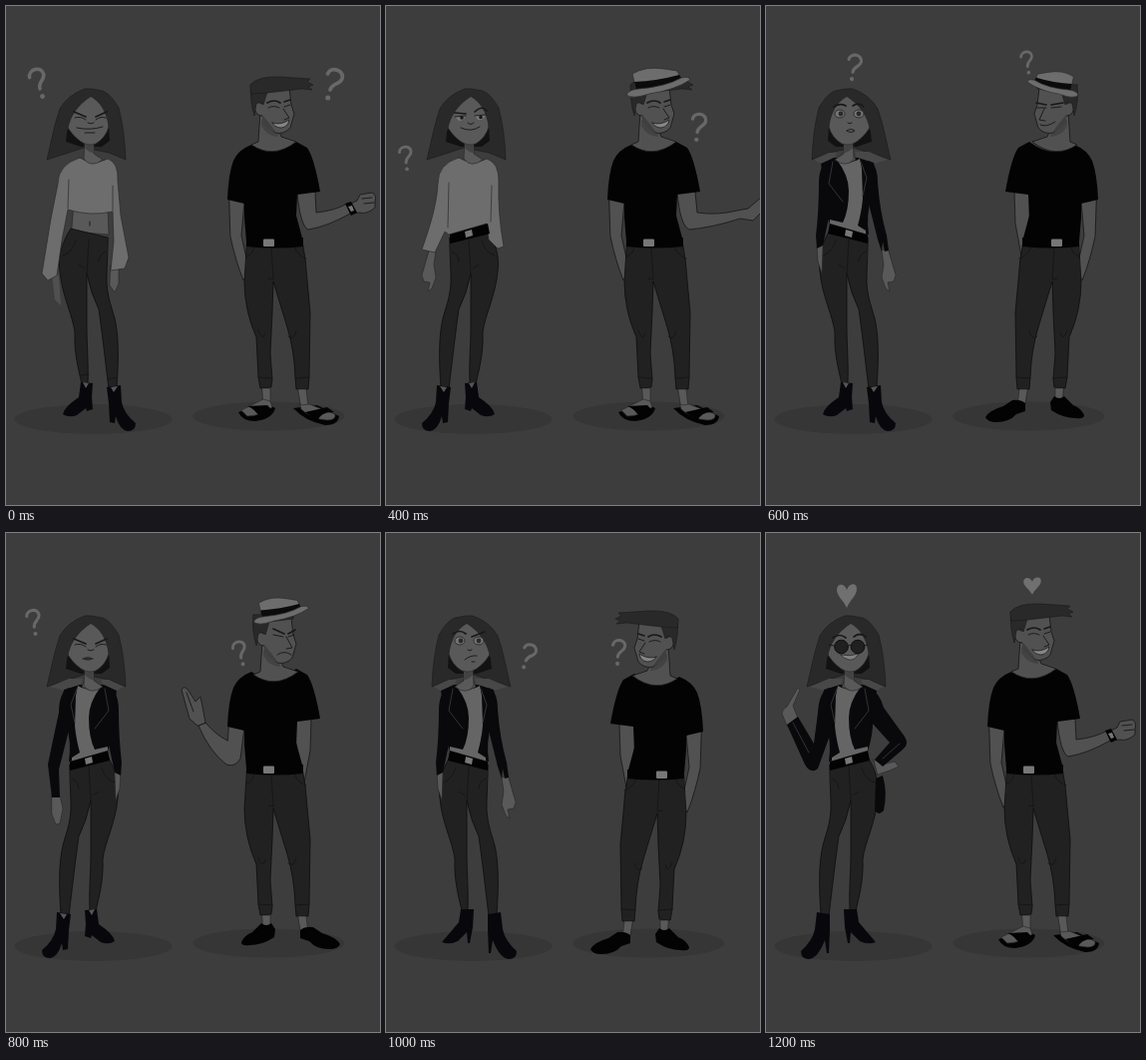
Write an HTML page that moves like this. It is 375 px wide and 500 px high and loops after 1.4 s.

```html
<!DOCTYPE html>
<html lang="en">
<head>
<meta charset="utf-8">
<title>Undecided couple</title>
<style>
html, body { margin: 0; width: 100%; height: 100%; overflow: hidden; background: #3d3d3d; }
svg { display: block; width: 375px; height: 500px; }
.pose { visibility: hidden; animation: show 1400ms step-end infinite; animation-delay: calc(200ms + var(--n) * 200ms); }
.first { animation: showLong 1400ms step-end infinite; }
@keyframes show { 0% { visibility: visible } 14.2857% { visibility: hidden } 100% { visibility: hidden } }
@keyframes showLong { 0% { visibility: visible } 28.5714% { visibility: hidden } 100% { visibility: hidden } }
path { stroke-linejoin: round; stroke-linecap: round; }
.skin { fill: #595959; stroke: #262626; stroke-width: .6; }
.tan { fill: #515151; stroke: #161616; stroke-width: .8; }
.shade { fill: #434343; }
.hair { fill: #292929; stroke: #1a1a1a; stroke-width: .6; }
.pants { fill: #212121; stroke: #0d0d0d; stroke-width: .8; }
.knit { fill: #6d6d6d; stroke: #2a2a2a; stroke-width: .7; }
.black { fill: #030303; }
.leather { fill: #09090c; }
.boot { fill: #08080c; }
.line { fill: none; stroke: #161616; stroke-width: .9; }
.thick { fill: none; stroke: #181818; stroke-width: 1.7; }
.zip { fill: none; stroke: #3e3e41; stroke-width: .8; }
.mark { fill: none; stroke: #686868; stroke-width: 3.6; }
.lit { fill: #777; }
.heart { fill: #707070; }
</style>
</head>
<body>
<svg viewBox="0 0 375 500">
<defs>
  <g id="ask">
    <path class="mark" d="M-7-9C-6-17 8-17 7.500-8C7-2-.5-2-.5 5"/>
    <circle cy="13" cx="-.5" r="2.400" fill="#686868"/>
  </g>
  <path id="heart" class="heart" d="M0 12C-3 5-10 0-10-6C-10-13-2-13 0-6C2-13 10-14 10-7C10 0 3 4 0 12Z"/>

  <!-- woman -->
  <g id="wLegs">
    <path class="pants" d="M64 232L101 223C111 238 114 254 112 266C110 290 99 310 97 327C98 348 93 365 90 379L84 379C83 360 85 340 85 322L85 268Q81 288 73 304C70 325 67 350 63 384L55 382C53 355 53 335 56 318C58 305 66 292 65 270Z"/>
    <path class="line" d="M66 246Q73 249 73 256M96 235Q99 247 109 250M83 234L85 270M87 263L93 259"/>
  </g>
  <g id="belt">
    <path class="black" d="M64 229L102 218L104 228L64 238Z"/>
    <path class="lit" d="M79 226L86 224L87 230L80 232Z"/>
  </g>
  <g id="boots">
    <path class="boot" d="M51 380L65 382L63 398L62 417L57 418L56 411Q52 425 44 426Q36 426 36 418Q48 408 50 397ZM79 378L91 377L93 392Q108 402 109 409Q103 413 95 410L86 403L85 406L79 404L80 392Z"/>
    <path d="M54 381L58 387L61 382ZM83 378L86 383L89 377Z" fill="#555"/>
  </g>
  <path id="points" class="boot" d="M51 380L64 382L64 398L63 421L61 421L59 408Q52 426 43 427Q35 427 35 419Q47 408 49 397ZM78 377L91 377L93 390L110 410Q102 413 94 409L85 400L84 411L82 411L79 395Z"/>
  <g id="wHairBack">
    <path class="hair" d="M79 83Q62 89 54 103C48 120 45 138 41 154L63 147L78 142L103 147L120 154Q119 125 113 102Q105 88 97 85L86 83Z"/>
    <path d="M62 119L60 136L75 141L96 141L104 135L103 119Z" fill="#121212"/>
  </g>
  <g id="wHead">
    <path class="skin" d="M79 136L78 153Q85 163 97 154L88 148L88 136Z"/>
    <path class="shade" d="M79 139L88 139L88 147Q83 147 79 142Z"/>
    <path class="skin" d="M85 88Q63 97 62 122Q70 134 79 138Q84 140 90 138Q100 132 103 121Q104 98 85 88Z"/>
    <path d="M79 84Q62 89 55 103L52 126L62 124Q66 103 85 91Q100 99 103 123L113 126Q113 108 110 97Q103 87 97 86L87 84Z" fill="#292929"/>
  </g>
  <path id="wHand" class="skin" d="M44 243L50 245L48 259L50 272L46 283L42 286L44 277L38 276L36 270Z"/>
  <g id="jacket">
    <path d="M44 154L63 146L77 146L75 153L58 158ZM95 147L103 147L118 154L111 158L98 154Z" fill="#484848"/>
    <path class="leather" d="M74 152L58 157Q54 172 60 190Q66 210 63 229L102 219Q108 200 107 185L111 158L98 152Z"/>
    <path d="M72 153Q84 160 95 154Q83 170 83 185Q83 205 89 217L102 214L102 219L66 229L66 225L74 220Q70 205 69 193L70 163Z" fill="#656565"/>
    <path class="skin" d="M78 150L76 154Q86 161 95 153L88 147Z"/>
    <path class="zip" d="M99 156L103 178L89 196M71 156L65 172L69 190"/>
  </g>
  <g id="rearSleeve">
    <path class="skin" d="M109 238L115 240L114 256L110 268Z"/>
    <path class="leather" d="M104 156Q113 160 113 178Q113 205 116 230L115 243L109 240L103 212Z"/>
  </g>
  <path id="sleeve" class="leather" d="M63 155Q54 159 54 177Q52 205 45 230L43 245L47 246L49 236L50 246L54 234L65 190Z"/>
  <g id="wCasual"><use href="#wLegs"/><use href="#belt"/></g>
  <g id="wCool">
    <use href="#wHairBack"/><use href="#wHand"/><use href="#wLegs"/><use href="#rearSleeve"/>
    <use href="#jacket"/><use href="#belt"/><use href="#sleeve"/><use href="#wHead"/>
  </g>
  <g id="wideEyes">
    <g fill="#747474" stroke="#222" stroke-width=".8"><ellipse cx="74" cy="108" rx="5" ry="4"/><ellipse cx="93" cy="108" rx="5" ry="4"/></g>
    <circle cx="75" cy="108" r="2.400" fill="#2a2a2a"/><circle cx="93" cy="108" r="2.400" fill="#2a2a2a"/>
    <path class="line" d="M82 117Q84 119 86 117"/>
  </g>
  <g id="glare">
    <path class="thick" d="M68 106L80 111M90 111L101 106"/>
    <path class="line" d="M69 112Q75 110 80 114M90 114Q95 110 100 112M82 117Q85 119 88 117"/>
  </g>

  <!-- man -->
  <g id="mLegs">
    <path class="pants" d="M242 235L297 235Q301 255 302 275L305 307L304 372L303 384L291 384L290 372Q289 345 282 322L268 276L267 307L265 348L267 374L266 382L255 383L253 372L251 332Q239 305 239 276Z"/>
    <path class="line" d="M241 251Q247 250 249 242M289 241Q292 250 301 253M266 242L268 274L263 273M253 325Q257 337 260 328M283 331Q288 336 291 326M253 372L267 373M290 373L304 372"/>
    <path class="black" d="M241 232L298 232L298 241Q270 244 241 241Z"/>
    <rect class="lit" x="258" y="233.500" width="11" height="7.500" rx="1"/>
    <path class="skin" d="M257 383L265 383L265 398L258 398ZM293 384L301 384L303 402L296 402Z"/>
  </g>
  <path id="shirt" class="black" d="M246 139Q268 154 291 136L302 142Q309 152 315 186L292 189L291 210L298 236L241 236L239 212L239 198L222 194Q223 168 228 155Q233 144 246 139Z"/>
  <path id="pocketL" class="tan" d="M224 192L239 196L236 230L244 266L238 275Q230 255 225 231Z"/>
  <path id="pocketR" class="tan" d="M291 186L306 186L305 218Q301 240 297 260L292 264L291 240Z"/>
  <g id="sandals">
    <path class="black" d="M233 407Q237 416 250 416Q267 414 270 403L261 398ZM288 403Q300 416 320 420Q333 420 334 411L312 400Z"/>
    <path class="skin" d="M236 405L258 394L265 396L267 402Q255 411 242 411ZM295 400L304 399L330 409Q331 415 322 415Q306 414 296 404Z"/>
    <path class="black" d="M242 401L262 400L268 406L255 413Q249 403 242 401ZM300 407L322 402L329 407Q316 406 312 416Z"/>
  </g>
  <path id="shoes" class="black" d="M236 410Q239 403 247 400L256 391Q261 395 266 391L270 397L269 405Q257 413 244 413Q236 414 236 410ZM295 398Q300 394 308 395L317 401Q331 405 335 412Q333 417 324 417Q311 417 304 409L295 406Z"/>
  <g id="mNeck">
    <path class="tan" d="M255 106L253 136L246 139Q268 154 291 136L276 131L272 122Z"/>
    <path class="shade" d="M256 114L272 125L273 131Q262 131 256 120Z"/>
  </g>
  <g id="mHead">
    <use href="#mNeck"/>
    <path class="tan" d="M257 84L284 82L286 99L289 108L285 122Q279 129 270 127Q260 119 257 110Q249 110 249 99Q251 94 256 98Z"/>
    <path d="M257 109Q264 117 271 127Q263 124 257 116Z" fill="#3f3f3f"/>
    <path class="hair" d="M246 79L287 77L286 83L262 86L258 99L255 96L251 98L249 110Q244 94 246 79Z"/>
  </g>
  <path id="quiff" class="hair" d="M245 79Q252 70 275 71L305 73L302 76L308 79L303 81L307 84Q296 82 288 84L262 87L246 88Z"/>
  <g id="grin">
    <path class="thick" d="M262 97Q269 93 275 97M279 96L285 94"/>
    <path class="line" d="M263 102Q268 99 274 102M279 101L285 99M278 103L284 112L279 114"/>
    <path d="M267 117Q275 120 284 114Q283 121 276 122Q270 122 267 117Z" fill="#858585" stroke="#161616" stroke-width=".7"/>
  </g>
  <g id="hat">
    <path class="knit" d="M251 84L247 68Q260 60 279 63L292 65L297 76Z"/>
    <path d="M249 76Q272 75 294 69L298 75Q277 83 251 84Z" fill="#0b0b0b"/>
    <path class="knit" d="M241 89Q243 84 253 83Q280 81 296 72Q304 70 305 74Q290 84 264 88Q246 94 241 89Z"/>
  </g>
  <g id="mStand"><use href="#shirt"/><use href="#mLegs"/></g>
  <g id="mRelaxed"><use href="#pocketL"/><use href="#pocketR"/><use href="#mStand"/><use href="#shoes"/></g>
  <g id="mWatch">
    <use href="#pocketL"/>
    <path class="tan" d="M292 187L310 186L311 207Q330 205 342 198L345 208Q322 221 303 224Q295 220 292 187Z"/>
    <path class="tan" d="M344 199L352 195L355 189L367 187Q372 189 370 196L370 202Q362 209 355 207L347 208Z"/>
    <path class="line" d="M357 193L367 192M359 198L369 197"/>
    <path class="black" d="M340 198L346 196L352 207L346 210Z"/>
    <path class="lit" d="M343 201L347 200L349 205L346 206Z"/>
    <use href="#mStand"/><use href="#sandals"/><use href="#mHead"/><use href="#quiff"/><use href="#grin"/>
  </g>
</defs>

<rect width="375" height="500" fill="#3d3d3d"/>
<g fill="#363636"><ellipse cx="87.500" cy="414" rx="79" ry="15"/><ellipse cx="263.500" cy="411" rx="76" ry="14.500"/></g>

<g class="pose first">
  <use href="#ask" transform="translate(33 78) rotate(-18)"/>
  <use href="#ask" transform="translate(327 79) rotate(16) scale(1.05)"/>
  <use href="#wHairBack"/>
  <path d="M46 268L53 270L55 300L49 294Z" fill="#505050"/>
  <path class="skin" d="M105 260L113 261L113 278L109 287L104 280ZM68 200L102 200L103 229L66 226Z"/>
  <path class="line" d="M84 216L84 220"/>
  <path class="skin" d="M76 370L82 370L83 386L77 386ZM104 370L110 370L111 388L105 388Z"/>
  <g transform="matrix(-1 0 0 1 166 0)">
    <use href="#wLegs"/><use href="#boots"/>
    <path class="line" d="M55 372L64 374M83 369L91 370"/>
  </g>
  <path class="knit" d="M74 152Q87 161 102 153Q113 157 112 175L115 210L123 252L119 263L105 265L108 236L107 206Q85 211 62 204L56 235L51 270L42 275L36 268L45 213L52 178Q52 159 74 152Z"/>
  <path class="line" d="M63 174L62 203M107 180L107 205" opacity=".6"/>
  <use href="#wHead"/><use href="#glare"/>
  <path class="line" d="M71 122Q84 125 97 121M79 127L89 127"/>
  <use href="#mWatch"/>
</g>

<g class="pose" style="--n:1">
  <use href="#ask" transform="translate(20 153) rotate(-8) scale(.8)"/>
  <use href="#ask" transform="translate(313 122) rotate(6) scale(.92)"/>
  <use href="#wHairBack"/><use href="#wHand"/><use href="#wCasual"/><use href="#boots"/>
  <path class="knit" d="M73 152Q87 161 101 153Q113 157 113 175Q112 208 118 241L112 243L103 234L101 218L63 229L59 226L49 247L36 244C45 218 51 198 52 178Q52 158 73 152Z"/>
  <path class="line" d="M63 177L62 222M106 180L105 216" opacity=".6"/>
  <use href="#belt"/><use href="#wHead"/>
  <path class="thick" d="M69 107L80 108M89 106Q96 99 101 105"/>
  <path d="M69 111L80 110Q78 115 73 115ZM89 110L100 109Q98 115 92 114Z" fill="#777"/>
  <path class="line" d="M69 111L80 110M89 110L100 109M82 117Q85 120 88 117M75 122Q85 127 94 121"/>
  <circle cx="76" cy="112" r="1.800" fill="#181818"/><circle cx="95" cy="111.500" r="1.800" fill="#181818"/>
  <use href="#pocketL"/>
  <path class="tan" d="M292 187L310 186L312 207Q332 210 352 205L363 203L376 192L376 207L368 215L355 213Q327 222 304 224Q295 220 292 187Z"/>
  <use href="#mStand"/><use href="#sandals"/><use href="#mHead"/><use href="#quiff"/><use href="#grin"/><use href="#hat"/>
</g>

<g class="pose" style="--n:2">
  <use href="#ask" transform="translate(88 62) rotate(8) scale(.87)"/>
  <use href="#ask" transform="translate(262 57) rotate(-10) scale(.75)"/>
  <g transform="matrix(-1 0 0 1 166 0)"><use href="#wCool"/><use href="#boots"/></g>
  <use href="#wideEyes"/>
  <path class="thick" d="M68 101Q74 97 80 100M87 100Q93 96 98 101"/>
  <path class="line" d="M81 125Q85 122 89 125Q85 128 81 125"/>
  <g transform="matrix(-1 0 0 1 555 0)"><use href="#mRelaxed"/></g>
  <g transform="matrix(-1 0 0 1 558 0)"><use href="#mHead"/></g>
  <path class="thick" d="M271 97L281 99M286 99L298 97"/>
  <path class="line" d="M272 102L281 102M286 102L296 101M279 103L274 114L280 115M275 119Q281 122 290 116"/>
  <use href="#hat" transform="matrix(-.8 0 0 .88 506 11)"/>
</g>

<g class="pose" style="--n:3">
  <use href="#ask" transform="translate(28 90) rotate(-10) scale(.85)"/>
  <use href="#ask" transform="translate(235 121) rotate(-16) scale(.82)"/>
  <use href="#wHairBack"/>
  <path class="skin" d="M46 262L54 263L57 276L54 291L50 292L46 282Z"/>
  <use href="#wLegs"/><use href="#rearSleeve"/><use href="#jacket"/><use href="#belt"/><use href="#boots"/>
  <path class="leather" d="M63 155Q53 160 53 180Q46 212 42 232L46 265L54 265L53 237L65 190Z"/>
  <use href="#wHead"/><use href="#glare"/>
  <path d="M77 126Q82 121 87 126Q82 130 77 126Z" fill="#3c3c3c"/>
  <path class="line" d="M77 126L87 126"/>
  <path class="tan" d="M224 189L239 195L235 226Q230 235 221 232Q204 219 193 193L200 190Q210 202 222 208Z"/>
  <path class="tan" d="M192 193L184 186L176 157Q179 152 183 158L190 169L195 164L197 174L200 190Z"/>
  <path class="line" d="M181 160L188 179"/>
  <use href="#pocketR"/><use href="#mStand"/><use href="#shoes"/>
  <g transform="translate(2 3)"><use href="#mHead"/></g>
  <path class="thick" d="M268 96L279 101M283 101L290 97"/>
  <path class="line" d="M268 102L278 104M283 104L289 102M281 104L287 115L281 116M272 122Q279 117 286 122"/>
  <use href="#hat" transform="matrix(.86 0 0 .9 41 9)"/>
</g>

<g class="pose" style="--n:4">
  <use href="#ask" transform="translate(142 124) rotate(18) scale(.85)"/>
  <use href="#ask" transform="translate(233 120) rotate(3) scale(.84)"/>
  <g transform="matrix(-1 0 0 1 166 0)"><use href="#wCool"/><use href="#points"/></g>
  <use href="#wideEyes"/>
  <path class="thick" d="M67 101Q74 96 80 101M86 104L99 99"/>
  <path class="line" d="M79 127Q85 122 91 123M86 129L89 129"/>
  <g transform="matrix(-1 0 0 1 540 5)"><use href="#mRelaxed"/></g>
  <g transform="matrix(-1 0 0 1 538 7)"><use href="#mHead"/><use href="#quiff"/><use href="#grin"/></g>
</g>

<g class="pose" style="--n:5">
  <use href="#heart" transform="translate(81 63)"/>
  <use href="#heart" transform="translate(267 53) scale(.88 .72)"/>
  <use href="#wHairBack"/>
  <use href="#wLegs"/><use href="#jacket"/><use href="#belt"/><use href="#points"/>
  <path class="zip" d="M107 172L108 210L113 246"/>
  <path class="leather" d="M110 246L117 243Q122 260 118 278Q113 284 109 278Z"/>
  <path class="skin" d="M21 193L16 181Q16 177 21 174L32 155L34 157L27 173L32 186ZM108 227L117 232L129 229L133 234L124 238L112 242Z"/>
  <path class="leather" d="M63 155Q53 160 52 180L48 211L32 184L21 192L39 232Q45 242 52 236L65 200ZM104 156Q114 160 118 175L139 204Q144 212 137 217L117 234L109 227L124 210L106 190Z"/>
  <path class="zip" d="M27 190L43 220M134 211L117 226"/>
  <use href="#wHead"/>
  <path class="thick" d="M67 105Q74 100 80 105M88 104Q94 99 100 104"/>
  <g fill="#202020" stroke="#0d0d0d"><circle cx="75.500" cy="114" r="6.800"/><circle cx="92" cy="114" r="6.800"/></g>
  <path class="line" d="M82 113Q84 111 86 113M63 112L69 113M98 113L102 112"/>
  <path d="M75 122Q84 124 93 121Q89 128 83 127Q78 126 75 122Z" fill="#808080" stroke="#222" stroke-width=".7"/>
  <use href="#mWatch"/>
</g>
</svg>
</body>
</html>
```
